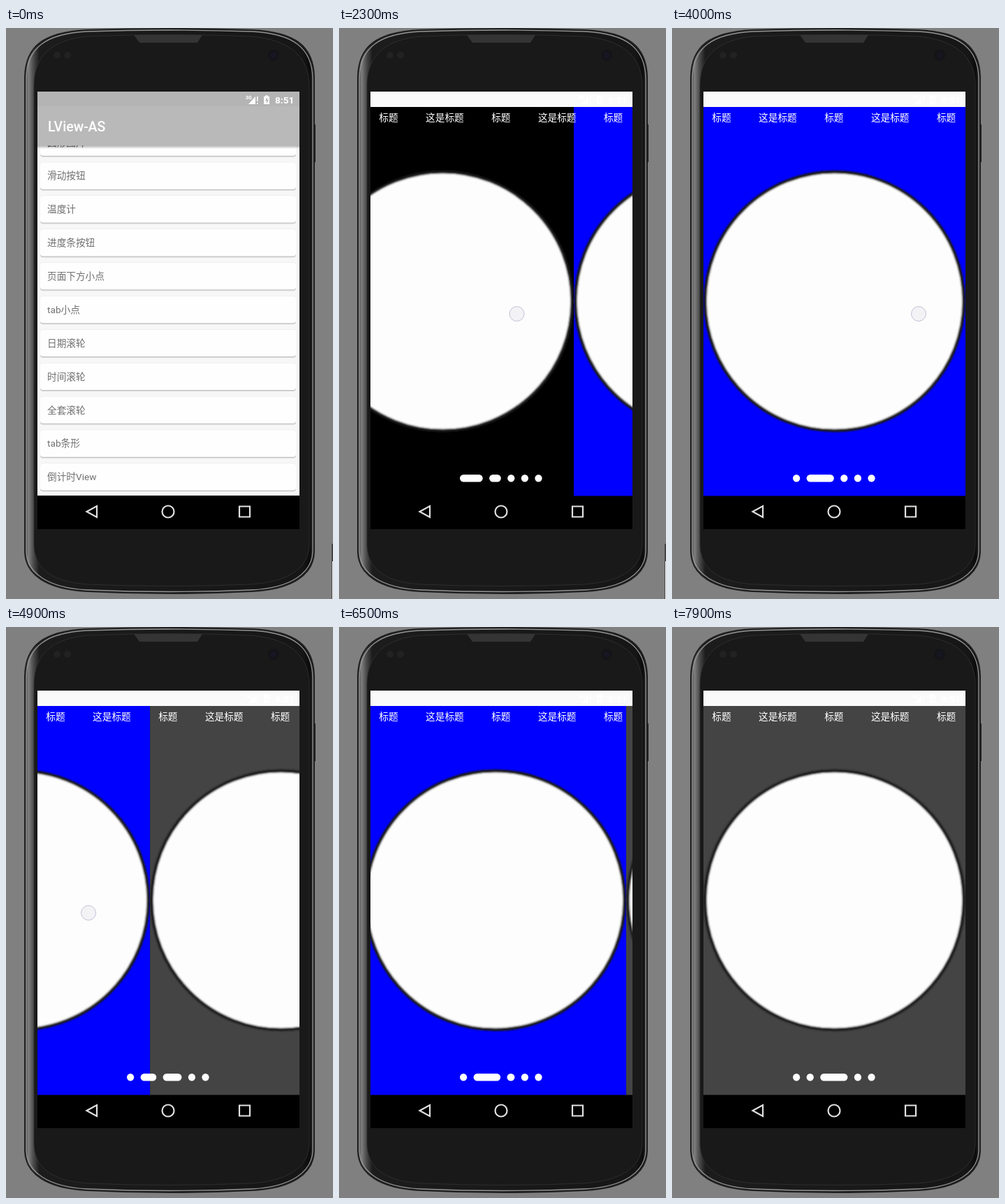
Write an HTML page that moves like this. It is 468 px wide and 817 px high and loops after 8 s.

```html
<!DOCTYPE html>
<html lang="zh">
<head>
<meta charset="utf-8">
<style>
html, body { margin: 0; width: 100%; height: 100%; overflow: hidden; background: #808080; }
svg { display: block; width: 468px; height: 817px; }
text { font-family: Roboto, "Noto Sans CJK SC", "Noto Sans CJK", sans-serif; font-size: 13.67px; }
</style>
</head>
<body>
<svg viewBox="0 0 468 817">
  <defs>
    <linearGradient id="rim">
      <stop offset="0" stop-color="#222"/>
      <stop offset=".012" stop-color="#808080"/>
      <stop offset=".03" stop-color="#4a4a4a"/>
      <stop offset=".05" stop-color="#1c1c1c"/>
      <stop offset=".96" stop-color="#161616"/>
      <stop offset=".985" stop-color="#0c0c0c"/>
      <stop offset="1" stop-color="#333"/>
    </linearGradient>
    <linearGradient id="fall" x2="0" y2="1">
      <stop stop-opacity=".3"/>
      <stop offset="1" stop-opacity="0"/>
    </linearGradient>
    <clipPath id="screen"><path d="M45 91h375v626h-375z"/></clipPath>
    <filter id="soft"><feGaussianBlur stdDeviation="1.3"/></filter>
  </defs>

  <rect width="468" height="817" fill="#808080"/>
  <g id="corner">
    <path d="M466 738h2v79h-2z" fill="#444"/>
    <path d="M467 763h1v54h-1z" fill="#fff"/>
  </g>

  <!-- phone body -->
  <path d="M441 138h2v54h-2z" fill="#222"/>
  <path d="M27 70C28 26 54 6 115 3Q234 -1 353 3C414 6 440 26 441 70V750C440 782 410 803 353 806Q234 812 115 806C58 803 28 782 27 750Z" fill="url(#rim)" stroke="#202020" stroke-width="2"/>
  <path d="M29 72C30 29 56 8 116 5Q234 1 352 5C412 8 438 29 439 72V749C438 780 408 801 352 804Q234 809 116 804C60 801 30 780 29 749Z" fill="none" stroke="#949494" stroke-width="1.3"/>
  <path d="M40 80C41 40 66 16 118 12Q234 7 350 12C404 16 433 40 434 80V740C433 774 402 793 350 796Q234 801 118 796C66 793 41 774 40 740Z" fill="#191919" stroke="#333" stroke-width=".8"/>
  <path d="M183 10H281L274 21H191Z" fill="#343434"/>
  <g fill="#222"><circle cx="73" cy="39" r="5"/><circle cx="88" cy="39" r="5"/></g>
  <circle cx="383" cy="39" r="8" fill="#141419"/>
  <circle cx="383" cy="39" r="4" fill="#171724"/>

  <g clip-path="url(#screen)">
    <g id="list">
      <path d="M45 91h375v626h-375z"/>
      <path d="M45 91h375v578h-375z" fill="#f7f7f7"/>
      <g id="cards"></g>
      <path d="M45 168h375v5h-375z" fill="url(#fall)"/>
      <path d="M45 91h375v77h-375z" fill="#b9b9b9"/>
      <path d="M45 91h375v21h-375z" fill="#b4b4b4"/>
      <text x="60" y="148" fill="#fff" style="font-size:19.5px;font-weight:500">LView-AS</text>
    </g>
    <g id="pager">
      <path d="M45 91h375v626h-375z"/>
      <g id="pages"></g>
      <path d="M45 91h375v22h-375z" fill="#fafafa"/>
      <g id="tabs" fill="#fff" text-anchor="middle" font-weight="500"></g>
      <g id="dots" fill="#fff"></g>
    </g>
    <g fill="#fff">
      <text x="343" y="102" style="font-size:7px;font-weight:700">3G</text>
      <path d="M347 109L357 98V109ZM359 98h1.5v7h-1.5zM359 107h1.5v2h-1.5zM369 98h2v-1.5h4v1.5h2v11h-8z"/>
      <path d="M374 99l-3 5h2v4l3-5h-2z" id="bolt"/>
      <text x="385" y="108" style="font-weight:700">8:51</text>
    </g>
    <g fill="none" stroke="#e0e0e0" stroke-width="2.2">
      <path d="M115.5 692L130 684V700Z"/>
      <circle cx="232" cy="692" r="8.5"/>
      <path d="M334 684.5h15v15h-15z"/>
    </g>
    <circle id="touch" cy="409" r="10.5" fill="#d8d8e4" fill-opacity=".25" stroke="#9090b8" stroke-opacity=".5"/>
  </g>
</svg>
<script>
const $ = id => document.getElementById(id);
const PAGE = 375;
const SLOP = 21; // finger travel before a page starts to follow

const items = ['圆形图片', '滑动按钮', '温度计', '进度条按钮', '页面下方小点', 'tab小点',
  '日期滚轮', '时间滚轮', '全套滚轮', 'tab条形', '倒计时View'];
$('cards').innerHTML = items.map((label, i) => {
  const y = 144.3 + i * 47.87;
  const card = (dy, fill) => `<rect x="49" y="${y + dy}" width="366" height="38.5" rx="4" fill="${fill}"/>`;
  return card(2, '#ddd') + card(1, '#bdbdbd') + card(-.5, '#e6e6e6') + card(0, '#fefefe') +
    `<text x="59" y="${y + 24.3}" fill="#707070">${label}</text>`;
}).join('');

$('pages').innerHTML = ['#000', '#00f', '#444'].map((fill, i) => `
  <g transform="translate(${45 + i * PAGE})">
    <rect y="113" width="${PAGE}" height="556.5" fill="${fill}"/>
    <circle cx="187.5" cy="391" r="185" fill="#fdfdfd" stroke="#1a1a1a" stroke-width="4.5" filter="url(#soft)"/>
  </g>`).join('');

$('tabs').innerHTML = ['标题', '这是标题', '标题', '这是标题', '标题'].map((label, i) =>
  `<text x="${71 + i * 80.4}" y="133">${label}</text>`).join('');

$('dots').innerHTML = '<rect y="639" height="10.5" rx="5.2"/>'.repeat(5);
const dots = [...$('dots').children];

// The finger lands at x, moves at a steady speed (px/ms), lifts, and the page settles on `to`.
const swipes = [
  { down: 1800, move: 1950, up: 2900, end: 3200, x: 359.5, speed: -.3, from: 0, to: 1 },
  { down: 4000, move: 4117, up: 5000, end: 5500, x: 353, speed: -.3, from: 1, to: 2 },
  { down: 5700, move: 5800, up: 6200, end: 6690, x: 109.5, speed: .605, from: 2, to: 1 },
  { down: 6900, move: 6950, up: 7500, end: 7900, x: 345, speed: -.4, from: 1, to: 2 }
];

const travel = (s, t) => s.speed * Math.max(0, Math.min(t, s.up) - s.move);

function position(s, t) {
  const moved = travel(s, t);
  const dragged = s.from - Math.sign(moved) * Math.max(0, Math.abs(moved) - SLOP) / PAGE;
  const rest = 1 - Math.min(1, Math.max(0, (t - s.up) / (s.end - s.up)));
  return s.to + (dragged - s.to) * rest ** 3;
}

function draw(t) {
  const open = t >= 700;
  const step = (t - 700) / 100;
  $('pager').style.display = open ? '' : 'none';
  $('pager').setAttribute('opacity', Math.min(1, .65 + .35 * step));
  $('pager').setAttribute('transform', `translate(0 ${t > 1000 ? 0 : 17 * .25 ** step})`);
  $('bolt').setAttribute('fill', open ? '#fafafa' : '#b4b4b4');

  const swipe = swipes.findLast(s => t >= s.down);
  const pos = swipe ? position(swipe, t) : 0;
  $('pages').setAttribute('transform', `translate(${-pos * PAGE})`);
  let x = 173;
  dots.forEach((dot, i) => {
    const width = 10.2 + 29 * Math.max(0, 1 - Math.abs(pos - i));
    dot.setAttribute('x', x);
    dot.setAttribute('width', width);
    x += width + 9.4;
  });

  const touching = swipe && t < swipe.up;
  $('touch').style.display = touching ? '' : 'none';
  if (touching) $('touch').setAttribute('cx', swipe.x + travel(swipe, t));

  $('corner').style.display = t < 2800 ? '' : 'none';
}

const start = performance.now();
function frame() {
  // the screen refreshes ten times a second
  draw(Math.floor((performance.now() - start) % 8000 / 100) * 100);
  requestAnimationFrame(frame);
}
frame();
</script>
</body>
</html>
```
